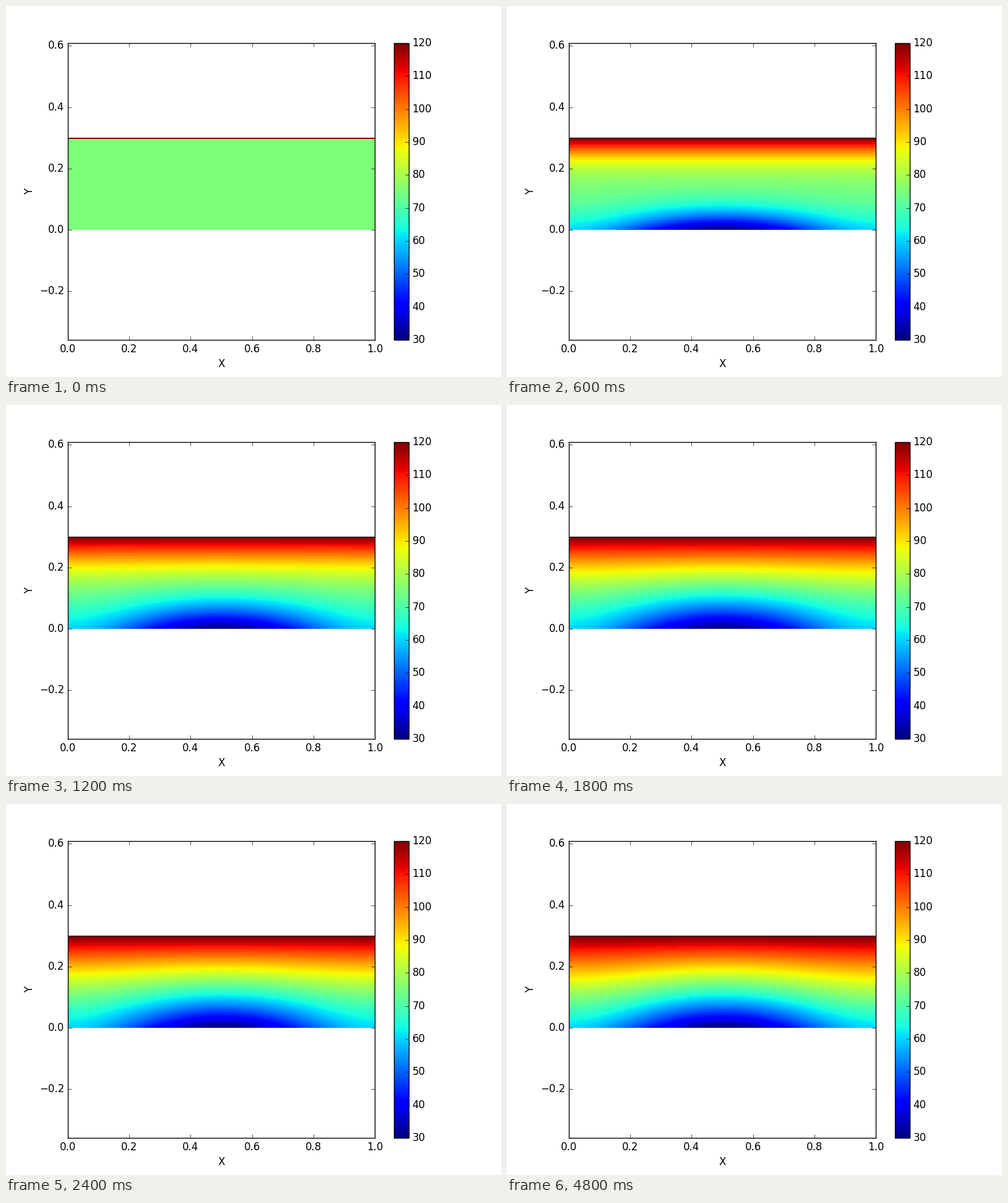
A matplotlib script that plays this animation: 800 px wide and 600 px high, repeating every 5400 ms.

```python
import numpy as np
import matplotlib.pyplot as plt
from matplotlib.animation import FuncAnimation

plt.style.use("classic")
plt.rcParams.update({"font.family": "DejaVu Sans", "savefig.dpi": "figure"})

FRAMES, INTERVAL = 18, 300
LAST = 16              # the final state is held for two frames
HEIGHT = 0.3
START, TOP = 75, 120
BASE, SWING = 45, 15   # bottom edge: BASE + SWING * cos(2 pi x)
STEP = 0.00125         # diffusivity times time per frame

ROWS, COLS = 60, 200
x = (np.arange(COLS) + 0.5) / COLS
s = np.linspace(0, 1, ROWS)
n = np.arange(1, 80)
modes = np.sin(np.pi * np.outer(s, n))
wave = np.cos(2 * np.pi * x)


def temperature(step):
    """Heat equation on a slab with fixed top and bottom, insulated sides."""
    if step == 0:
        field = np.full((ROWS, COLS), float(START))
        field[-1] = TOP
        return field
    t = step * STEP
    k = 2 * np.pi
    decay = np.exp(-(n * np.pi / HEIGHT) ** 2 * t)

    sign = (-1.0) ** n
    coef = 2 / (n * np.pi) * ((START - BASE) + (TOP - START) * sign)
    mean = BASE + (TOP - BASE) * s + modes @ (coef * decay)

    kh = k * HEIGHT
    coef = 2 * n * np.pi / ((n * np.pi) ** 2 + kh ** 2)
    ripple = np.sinh(kh * (1 - s)) / np.sinh(kh)
    ripple = SWING * (ripple - modes @ (coef * decay) * np.exp(-k * k * t))
    return mean[:, None] + np.outer(ripple, wave)


fig = plt.figure(figsize=(8, 6), dpi=100, facecolor="white")
ax = fig.add_axes([0.125, 0.1, 0.62, 0.8])
cax = fig.add_axes([0.78375, 0.1, 0.03, 0.8])

image = ax.imshow(temperature(0), cmap="jet", vmin=30, vmax=120,
                  origin="lower", extent=(0, 1, 0, HEIGHT),
                  interpolation="nearest", aspect="auto")
edge, = ax.plot([0, 1], [HEIGHT, HEIGHT], color="black", lw=0.8)

half = 0.5 * 480 / 496
ax.set_xlim(0, 1)
ax.set_ylim(0.125 - half, 0.125 + half)
ax.set_xticks(np.arange(0, 1.1, 0.2))
ax.set_yticks([-0.2, 0, 0.2, 0.4, 0.6])
ax.set_xlabel("X")
ax.set_ylabel("Y")
fig.colorbar(image, cax=cax, ticks=range(30, 121, 10))


def update(frame):
    step = min(frame, LAST)
    image.set_data(temperature(step))
    edge.set_visible(step > 0)
    return image, edge


anim = FuncAnimation(fig, update, frames=FRAMES, interval=INTERVAL,
                     repeat=True, repeat_delay=0, blit=False)
plt.show()
```
